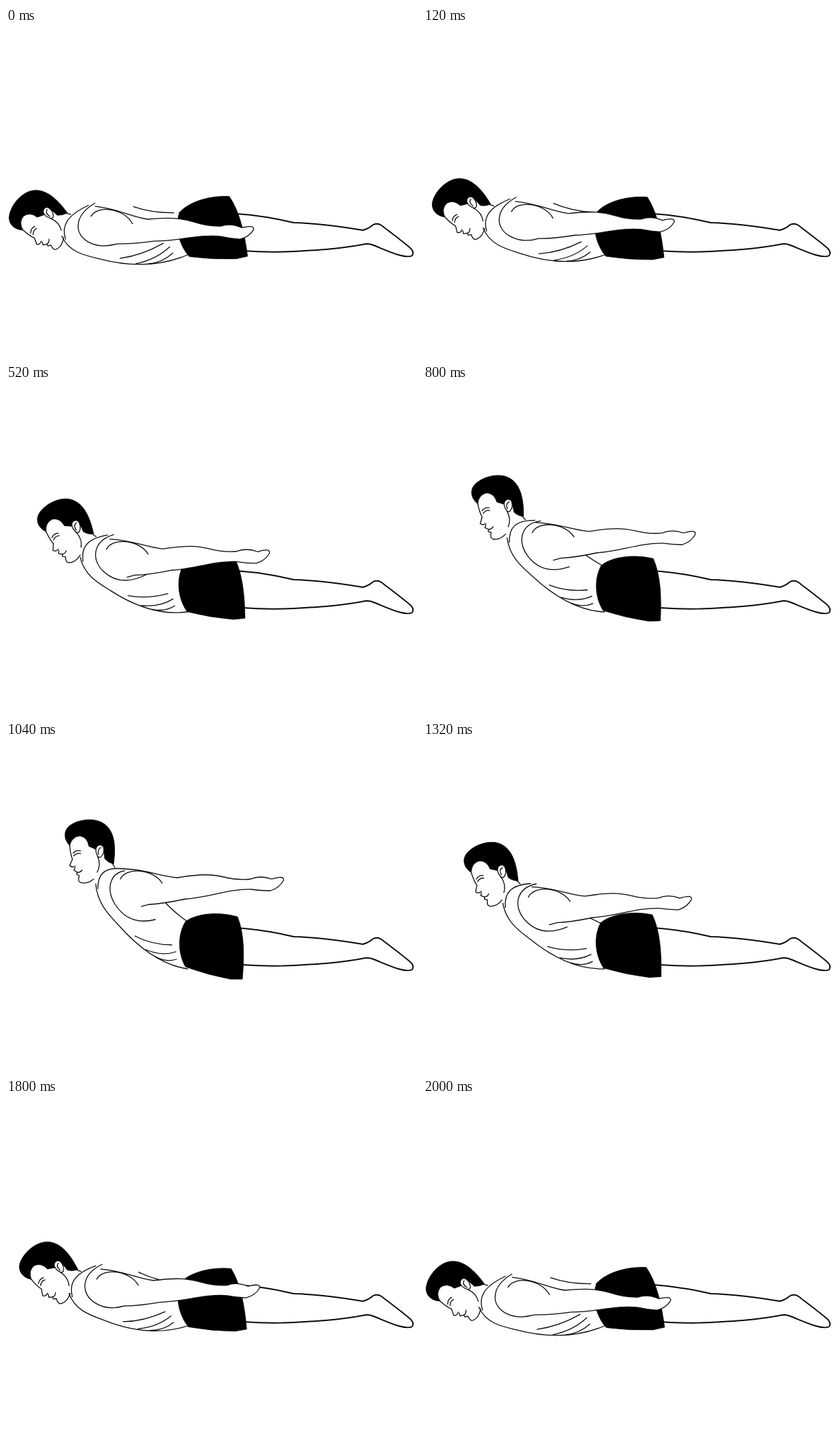
An HTML page for the animation above (2240 ms loop, 600 by 480 pixels).

```html
<!DOCTYPE html>
<html lang="en">
<head>
<meta charset="utf-8">
<title>Prone back extension</title>
<style>
  /* --lift: 0 lying flat, 1 the raised pose as drawn below */
  @property --lift { syntax: "<number>"; inherits: true; initial-value: 0; }

  html, body { margin: 0; width: 100%; height: 100%; overflow: hidden; background: #fff; }
  svg {
    display: block; width: 600px; height: 480px;
    /* 25 steps of 40 ms up, 25 down, then a rest */
    animation: raise 2240ms steps(25) -1ms infinite;
  }
  @keyframes raise {
    0%, 89.285714%, 100% { --lift: 0; }
    44.642857% { --lift: 1.0417; }
  }

  path {
    fill: none; stroke: #0a0a0a; stroke-width: 1.3; stroke-linecap: round;
    stroke-linejoin: round; vector-effect: non-scaling-stroke;
  }
  .black { fill: #000; stroke: #000; stroke-width: .8; }
  .white { fill: #fff; }
  .leg { stroke-width: 1.9; }

  g { --drop: calc(1 - var(--lift)); --sag: calc(var(--lift) * var(--drop)); }
  #head {
    transform-origin: 137px 159px;
    transform:
      translate(calc(var(--drop) * -75px), calc(var(--drop) * 111px - var(--sag) * 14px))
      rotate(calc(var(--drop) * -44deg));
  }
  #arm {
    transform-origin: 198px 240px;
    transform:
      translate(calc(var(--drop) * -46px), calc(var(--drop) * 77px + var(--sag) * 20px))
      rotate(calc(var(--drop) * var(--drop) * 4.3deg));
  }
  #shorts {
    transform-origin: 290px 305px;
    transform: rotate(calc(var(--drop) * -12.6deg));
  }
  /* The trunk leans over while its waist stays at the hip */
  #trunk {
    transform-origin: 265px 331px;
    transform: matrix(
      calc(1 + .1 * var(--drop)), calc(-.62 * var(--drop)),
      calc(.29 * var(--drop)), calc(1 - .11 * var(--drop)), 0, 0);
  }
</style>
</head>
<body>
<svg viewBox="0 0 600 480">
  <path class="leg" d="M336,271 C366,273 395,278 420,284 C455,285 490,290 521,295
    Q529,293 536,287 Q544,283 552,291 Q572,306 588,319 Q597,326 593,332
    C583,338 555,324 534,316 Q527,314 520,316 C490,322 455,324 420,326 Q385,328 345,325"/>

  <g id="trunk">
    <path d="M131,207 C133,235 150,252 165,268 C190,296 225,325 265,331"/>
    <path d="M222,222 Q240,245 265,262"/>
    <path d="M134,214 C134,192 144,182 172,185"/>
    <path d="M180,187 C150,188 145,216 160,238 C172,256 190,266 218,259"/>
    <!-- folds -->
    <path d="M188,283 Q213,296 242,296"/>
    <path d="M204,303 Q228,313 248,306"/>
    <path d="M218,313 Q234,322 249,317"/>
  </g>

  <g id="shorts">
    <path class="black" d="M262,262 C275,252 305,246 338,255 C348,280 348,312 345,346
      L328,346 Q295,340 262,328 C251,309 250,281 262,262Z"/>
  </g>

  <g id="arm">
    <path class="white" d="M172,185 C205,186 225,196 250,198 C285,192 300,193 318,197
      Q338,202 357,200 Q371,194 388,200 Q407,194 405,202 Q399,213 386,217 Q372,217 358,215
      C325,214 295,227 262,229 Q230,236 209,237 L198,240"/>
    <path d="M167,200 C175,182 215,185 228,206"/>
  </g>

  <g id="head">
    <path class="black" d="M93,151 C84,142 84,130 92,123 C104,113 127,110 141,118
      C158,128 161,150 157,178 Q149,176 144,170 L143,153 Q136,147 132,157 L121,152
      Q119,139 108,137 Q96,138 93,151Z"/>
    <path class="white" d="M134,167 C129,158 131,150 138,150 C145,151 144,163 138,168 Q136,169 134,167"/>
    <path d="M135,164 Q133,156 139,154"/>
    <path d="M134,167 Q139,180 133,190"/>
    <path d="M155,177 L159,183"/>
    <!-- profile -->
    <path d="M93,151 Q94,164 97,171 L93,180 Q96,184 101,181"/>
    <path d="M101,183 L99,187 L104,190 L103,193 L107,195 Q104,204 109,205 Q118,208 128,200"/>
    <path d="M104,190 Q108,191 111,187"/>
    <!-- brow and eye -->
    <path d="M98,162 Q103,157 109,159"/>
    <path d="M99,166 Q104,161 109,163"/>
  </g>
</svg>
</body>
</html>
```
